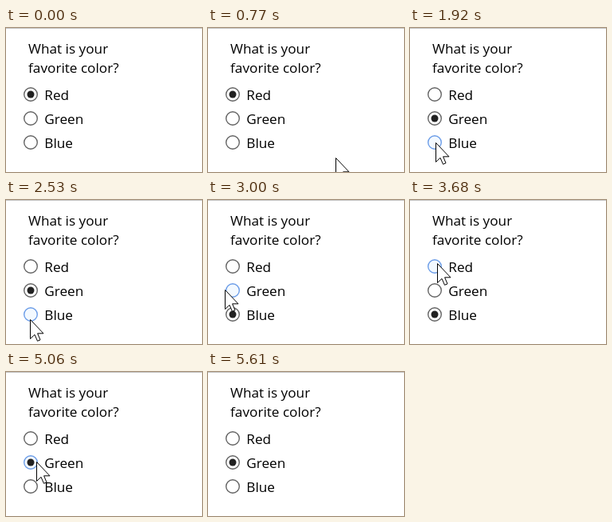
Animation of 246x180 px, one loop 6140 ms. Source, as an HTML page:

```html
<!DOCTYPE html>
<html lang="en">
<head>
<meta charset="utf-8">
<title>Favorite color</title>
<style>
  html, body { margin: 0; width: 100%; height: 100%; overflow: hidden; background: #fff; }
  svg { display: block; width: 100%; height: 100%; }
  text { font-family: "Open Sans", "Noto Sans", sans-serif; font-size: 17.2px; fill: #000; }
</style>
</head>
<body>
<svg viewBox="0 0 246 180">
  <rect width="246" height="1" fill="#c6c6c6"/>
  <text x="28" y="32">What is your</text>
  <text x="28" y="56">favorite color?</text>
  <g id="options"></g>
  <circle id="click" r="18" fill="#ff0" fill-opacity=".47"/>
  <path id="cursor" d="M.5 .5V24.5L6 19.3L9.5 27.3L13 25.8L9.6 17.8H17Z" fill="#fff" stroke="#000"/>
</svg>
<script>
const LOOP = 6140;
const TICK = 76.75;
const HOVER_LAG = 0.8; // ticks by which the highlight trails the pointer
const LABELS = ["Red", "Green", "Blue"];
const ROW = 30, FIRST_ROW = 68;

const COLORS = {
  normal: { fill: "#fff", stroke: "#646464" },
  hover: { fill: "#f3f9ff", stroke: "#6c9de8" },
  pressed: { fill: "#d9ecff", stroke: "#3c77dd" }
};

const $ = id => document.getElementById(id);

function set(el, attrs) {
  for (const key in attrs) el.setAttribute(key, attrs[key]);
  return el;
}

function add(tag, attrs) {
  const el = document.createElementNS("http://www.w3.org/2000/svg", tag);
  return $("options").appendChild(set(el, attrs));
}

const options = LABELS.map((label, i) => {
  const cy = 83 + i * ROW;
  const ring = add("circle", { cx: 31, cy, r: 8.3, "stroke-width": 1.4 });
  const dot = add("circle", { cx: 31, cy, r: 4.5, fill: "#212121" });
  add("text", { x: 48.3, y: cy + 7 }).textContent = label;
  return { ring, dot };
});

// The session is a script of pointer actions, with durations in ticks
const moves = [], clicks = [];
let clock = 8, at = { x: 189, y: 170 };

function wait(ticks) {
  clock += ticks;
}

function move(ticks, x, y) {
  const to = { x, y };
  moves.push({ start: clock, end: clock + ticks, from: at, to });
  at = to;
  wait(ticks);
}

function click(option) {
  clicks.push({ down: clock, up: clock + 2, option });
  wait(2);
}

move(7, 44, 130);
move(1, 35, 122);
wait(3);
click(1);
move(6, 31, 151);
move(6, 30, 149);
wait(2);
click(2);
move(2, 21, 112);
move(4, 39, 75);
wait(2);
move(3, 34, 79);
wait(2);
click(0);
move(3, 30, 121);
move(2, 28, 112);
wait(6);
click(1);
move(5, 126, 115);
move(2, 166, 153);

const ease = k => k * k * (3 - 2 * k);
const mix = (a, b, k) => Math.round(a + (b - a) * k);

function pointerAt(tick) {
  if (tick < moves[0].start || tick > clock) return null;
  const { start, end, from, to } = moves.filter(m => m.start <= tick).pop();
  const k = ease(Math.min(1, (tick - start) / (end - start)));
  return { x: mix(from.x, to.x, k), y: mix(from.y, to.y, k) };
}

function optionUnder(p) {
  return p && p.x >= 20 && p.x <= 98 ? Math.floor((p.y - FIRST_ROW) / ROW) : -1;
}

function show(el, on) {
  set(el, { visibility: on ? "visible" : "hidden" });
}

function draw(ms) {
  const tick = Math.floor((ms + 8) / TICK);
  const pointer = pointerAt(tick);
  const hovered = pointer ? optionUnder(pointerAt(tick - HOVER_LAG)) : -1;
  const press = clicks.find(c => tick >= c.down && tick < c.up);
  const selected = clicks.reduce((s, c) => tick >= c.up ? c.option : s, 0);

  options.forEach(({ ring, dot }, i) => {
    const state = press && press.option === i ? "pressed" : hovered === i ? "hover" : "normal";
    set(ring, COLORS[state]);
    show(dot, selected === i);
  });

  show($("cursor"), pointer);
  show($("click"), press);
  if (pointer) {
    const transform = `translate(${pointer.x} ${pointer.y})`;
    set($("cursor"), { transform });
    set($("click"), { transform });
  }
}

const begin = performance.now();
function frame() {
  draw((performance.now() - begin) % LOOP);
  requestAnimationFrame(frame);
}
frame();
</script>
</body>
</html>
```
